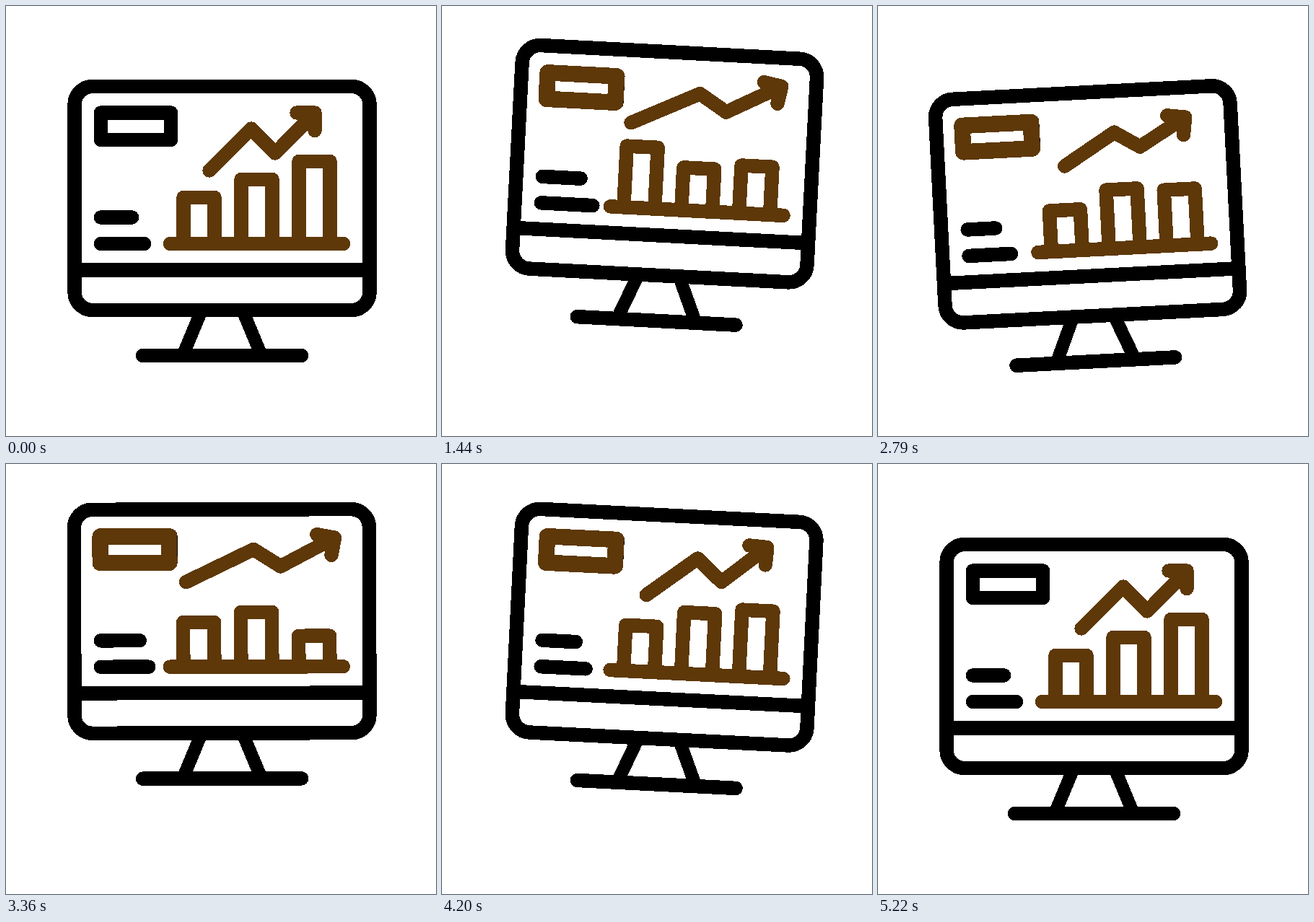
Animation of 596 by 596 pixels, one loop 5400 ms. Source, as an HTML page:

```html
<!DOCTYPE html>
<html lang="en">
<head>
<meta charset="utf-8">
<title>Growth chart</title>
<style>
  html, body { margin: 0; width: 100%; height: 100%; overflow: hidden; background: #fff; }
  svg { display: block; width: 100%; height: 100%; }
  path, rect { fill: none; stroke: #000; stroke-width: 19.5; stroke-linecap: round; stroke-linejoin: round; shape-rendering: crispEdges; }
  .accent, .accent path { stroke: #5e3808; }
</style>
</head>
<body>
<svg viewBox="0 0 596 596">
  <g id="monitor">
    <path d="M271 422L246 482M328 422L353 482" style="stroke-width:18"/>
    <path d="M189.5 484.5H409.5"/>
    <rect x="95" y="111.5" width="409" height="310" rx="25"/>
    <path d="M95 366H504"/>
    <rect x="131.5" y="148" width="97" height="37.5"/>
    <rect id="label" class="accent" x="131.25" y="148.75" width="95.5" height="36.5" style="stroke-width:22.5"/>
    <path id="lines"/>
    <g class="accent">
      <path id="bars"/>
      <path d="M227.5 329.5H467.5"/>
      <path id="trend"/>
      <path id="head" d="M-25 0H0V24.5"/>
    </g>
  </g>
</svg>
<script>
const LOOP = 5400, STEP = 30, BASE = 329.5;
const $ = id => document.getElementById(id);

// Turning points in time: the whole monitor, and the data on its screen.
const BODY = [230, 1080, 2390, 3720, 4880];
const DATA = [280, 1400, 2250, 3350, 4700];
const TILT_DELAY = 320;

function ramp(t, from, to) {
  const u = Math.min(1, Math.max(0, (t - from) / (to - from)));
  return (1 - Math.cos(Math.PI * u)) / 2;
}

// On and off again, eased at both ends.
const pulse = (t, a, b, c, d) => ramp(t, a, b) - ramp(t, c, d);

// Rest, three turning values, back to rest.
function swing(t, beats, rest, ...turns) {
  const v = [rest, ...turns, rest];
  return v.slice(1).reduce((sum, next, i) => sum + (next - v[i]) * ramp(t, beats[i], beats[i + 1]), rest);
}

function draw(t) {
  const lift = swing(t, BODY, 0, -64, 27, -64);
  const tilt = swing(t - TILT_DELAY, BODY, 0, 3, -3, 3);
  $('monitor').setAttribute('transform', `translate(0 ${lift}) rotate(${tilt} 299 440)`);
  $('label').style.opacity = pulse(t, 930, 1200, 4560, 4830);

  const data = (...values) => swing(t, DATA, ...values);
  const line = (y, end) => `M131.5 ${y}H${end}`;
  $('lines').setAttribute('d',
    line(293, data(174.5, 184.5, 155.5, 185.5)) +
    line(BASE, data(191.5, 203, 182.5, 198)));

  const heights = [data(64, 85, 52, 61.5), data(89, 59, 87, 75.5), data(114, 66, 110, 42.5)];
  $('bars').setAttribute('d', heights.map((h, i) => `M${246 + 80 * i} ${BASE}v${-h}h43v${h}`).join(''));

  // The trend line stretches sideways and flattens.
  const s = data(0, 1, -0.2, 1), f = pulse(t, 700, DATA[1], DATA[3], DATA[4]);
  const tip = [428 + 3 * f + 25 * s, 148 + 6 * f - 3 * s];
  const points = [
    282 + f - 33 * s, 228 - 16 * f,
    340 + 3.5 * s, 170 - 3 * s,
    373 + 8 * s, 204 - 13.5 * f,
    ...tip
  ];
  $('trend').setAttribute('d', 'M' + points.join(' '));
  $('head').setAttribute('transform', `translate(${tip}) rotate(${6.5 * f + 4 * s})`);
}

const start = performance.now();
function tick() {
  const t = (performance.now() - start) % LOOP;
  draw(Math.floor(t / STEP) * STEP);
  requestAnimationFrame(tick);
}
tick();
</script>
</body>
</html>
```
